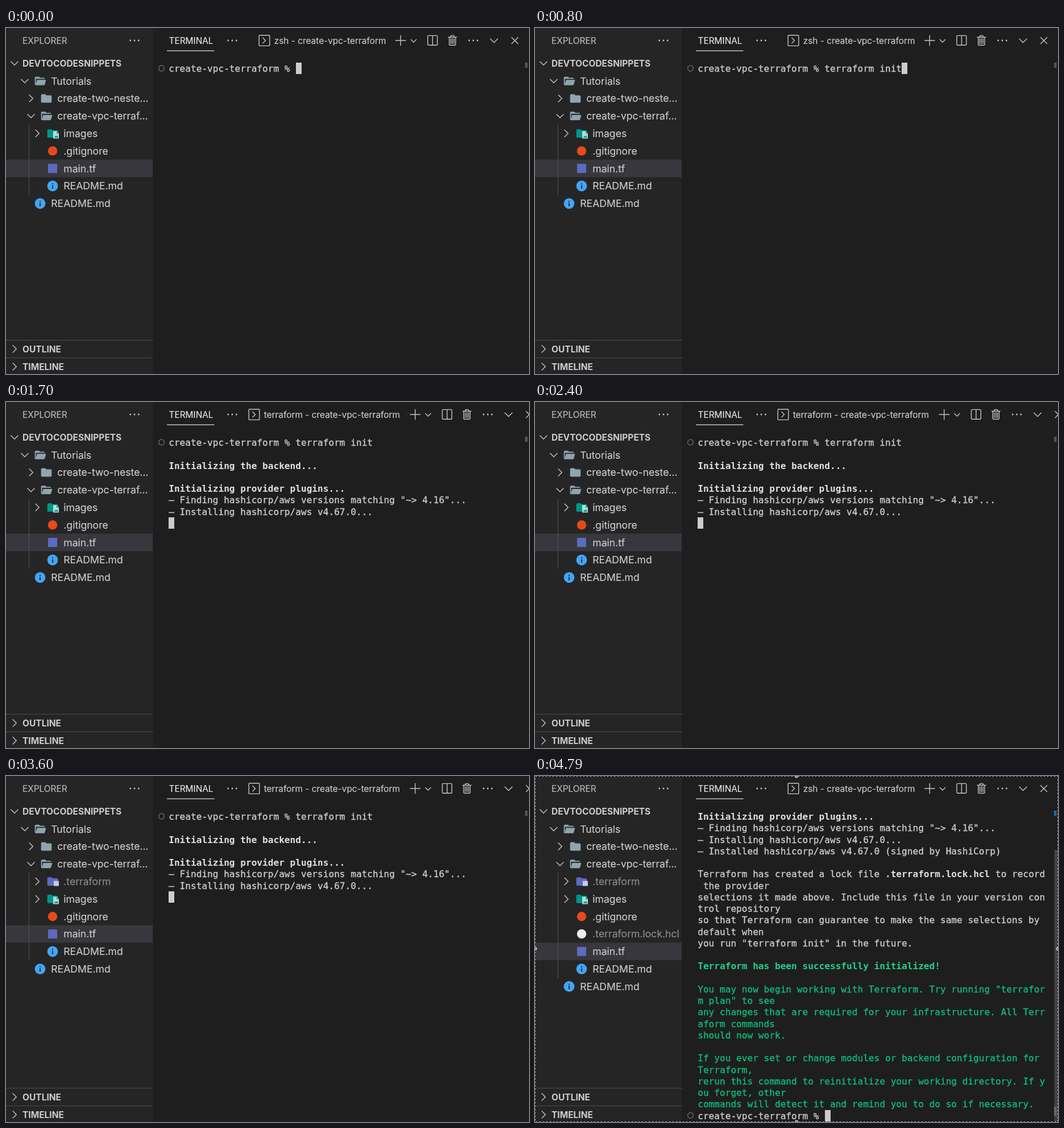
Write an HTML page that moves like this. It is 920 px wide and 609 px high and loops after 4970 ms.

```html
<!DOCTYPE html>
<html lang="en">
<head>
<meta charset="utf-8">
<title>Terminal session</title>
<style>
  html, body { margin: 0; width: 100%; height: 100%; overflow: hidden; background: #1e1e1e; }
  svg { display: block; width: 920px; height: 609px; }
  text { white-space: pre; font-family: Inter, "Open Sans", sans-serif; color: #ccc; }
  text, tspan { fill: currentColor; stroke: currentColor; stroke-width: .15px; }
  .tree { font-size: 17.6px; }
  .head { font-size: 15.4px; }
  .bold { font-size: 15.5px; font-weight: 700; stroke-width: 0; }
  .dim { color: #8c8c8c; }
  .soft { color: #bbb; }
  .lit { color: #e7e7e7; }
  .term { font: 16.13px "DejaVu Sans Mono", "Liberation Mono", monospace; font-variant-ligatures: none; stroke-width: .35px; }
  .strong { font-weight: 700; color: #e0e0e0; stroke-width: 0; }
  .green { color: #0dbc79; }
  .green .strong { color: #23d18b; }
  .line { fill: none; stroke: #c5c5c5; stroke-width: 1.4; }
</style>
</head>
<body>
<svg viewBox="0 0 920 609">
  <defs><clipPath id="side"><rect width="258" height="609"/></clipPath></defs>
  <rect width="920" height="609" fill="#1e1e1e"/>
  <rect width="258.5" height="609" fill="#252526"/>
  <g id="tree" clip-path="url(#side)"></g>
  <g id="frame"></g>
  <g id="bar"></g>
  <g id="term"></g>
  <g id="marquee"></g>
</svg>
<script>
const LOOP = 4970;
const ROW = 30.8, LINE = 20.25, CELL = 9.71, LEFT = 286.2, TOP = 61.4;
const el = id => document.getElementById(id);

const text = (x, y, s, cls) => `<text x="${x}" y="${y}" class="${cls}">${s}</text>`;
const path = d => `<path class="line" d="${d}"/>`;
const rect = (x, y, w, h, fill) => `<rect x="${x}" y="${y}" width="${w}" height="${h}" fill="${fill}"/>`;
const disc = (x, y, r, fill) => `<circle cx="${x}" cy="${y}" r="${r}" fill="${fill}"/>`;
const glyph = (x, y, scale, d, fill) =>
  `<path transform="translate(${x} ${y}) scale(${scale})" d="${d}" fill="${fill}" fill-rule="evenodd"/>`;
const down = (x, y, w = 6.5) => path(`M${x - w} ${y - w / 2}l${w} ${w}l${w} ${-w}`);
const right = (x, y, w = 6.5) => path(`M${x - w / 2} ${y - w}l${w} ${w}l${-w} ${w}`);
const dots = (x, y) => [-7.3, 0, 7.3].map(d => disc(x + d, y, 1.4, '#c5c5c5')).join('');

const SHUT = 'M10 4H4c-1.11 0-2 .89-2 2v12a2 2 0 0 0 2 2h16a2 2 0 0 0 2-2V8a2 2 0 0 0-2-2h-8l-2-2z';
const OPEN = 'M19 20H4c-1.11 0-2-.9-2-2V6c0-1.11.89-2 2-2h6l2 2h7a2 2 0 0 1 2 2H4v10l2.14-8h17.07l-2.28 8.5c-.23.87-1.01 1.5-1.93 1.5z';
const SPLIT = 'M14 1H3L2 2v11l1 1h11l1-1V2l-1-1zM8 13H3V2h5v11zm6 0H9V2h5v11z';
const TRASH = 'M10 3h3v1h-1v9l-1 1H4l-1-1V4H2V3h3V2a1 1 0 0 1 1-1h3a1 1 0 0 1 1 1v1zM9 2H6v1h3V2zM4 13h7V4H4v9zm2-8H5v7h1V5zm1 0h1v7H7V5zm2 0h1v7H9V5z';
const folder = (x, y, d, fill) => glyph(x - 11.2, y - 11.2, .933, d, fill);

const icons = {
  open: (x, y) => folder(x, y, OPEN, '#90a4ae'),
  shut: (x, y) => folder(x, y, SHUT, '#90a4ae'),
  images: (x, y) => folder(x, y, SHUT, '#009688') +
    `<path d="M${x + 1} ${y - 4}h6l4 4v9h-10z" fill="#b2dfdb"/>` +
    `<path d="M${x + 7} ${y - 3}v3.5h3.5zM${x + 2.5} ${y + 7.5}l2.5-3.5 1.5 1.5 1.5-2.5 2 4.5z" fill="#009688"/>`,
  badge: (x, y) => folder(x, y, SHUT, '#5c6bc0') + rect(x + 2, y - 1, 9, 9, '#c5cae9'),
  git: (x, y) => disc(x, y, 8.2, '#e64a19'),
  tf: (x, y) => rect(x - 8, y - 8, 16, 16, '#5c6bc0'),
  lock: (x, y) => disc(x, y, 8.2, '#eceff1'),
  info: (x, y) => disc(x, y, 9.4, '#42a5f5') +
    rect(x - 1, y - 4.7, 2, 2, '#252526') + rect(x - 1, y - 1, 2, 5.8, '#252526')
};

const entry = (depth, icon, label, chevron, dim) => ({ depth, icon, label, chevron, dim });

function drawTree(hasDir, hasLock) {
  const list = [
    entry(0, 'open', 'Tutorials', down),
    entry(1, 'shut', 'create-two-neste...', right),
    entry(1, 'open', 'create-vpc-terraf...', down),
    hasDir && entry(2, 'badge', '.terraform', right, true),
    entry(2, 'images', 'images', right),
    entry(2, 'git', '.gitignore'),
    hasLock && entry(2, 'lock', '.terraform.lock.hcl', null, true),
    entry(2, 'tf', 'main.tf'),
    entry(2, 'info', 'README.md'),
    entry(0, 'info', 'README.md')
  ].filter(Boolean);
  let out = '', guideEnd = 0;
  list.forEach((e, i) => {
    const y = 93.2 + i * ROW, x = 60 + e.depth * 11;
    if (e.label === 'main.tf') out += rect(0, y - ROW / 2, 258.5, ROW, '#37373d');
    if (e.depth === 2) guideEnd = y + ROW / 2;
    if (e.chevron) out += e.chevron(x - 27, y);
    out += icons[e.icon](x, y) + text(x + 19.3, y + 6.3, e.label, e.dim ? 'tree dim' : 'tree');
  });
  return out + rect(39.8, 170.2, 1, guideEnd - 170.2, '#585858');
}

function drawFrame() {
  return text(29, 27.6, 'EXPLORER', 'head soft') + dots(226, 22) +
    down(15, 62) + text(29, 68, 'DEVTOCODESNIPPETS', 'bold') +
    rect(0, 549, 258.5, 1, '#4b4b4c') + right(15, 565) + text(29, 570.8, 'OUTLINE', 'bold') +
    rect(0, 580, 258.5, 1, '#4b4b4c') + right(15, 596) + text(29, 601.6, 'TIMELINE', 'bold') +
    text(286.5, 27.6, 'TERMINAL', 'head lit') + rect(283, 39.5, 83.5, 1.2, '#e7e7e7') + dots(398, 22);
}

function drawBar(shell) {
  const wide = shell !== 'zsh', x = wide ? 436.5 : 454.5;
  const tools =
    path('M685 22h18.5M694.2 12.8v18.5') + down(717, 22.5, 5) +
    glyph(738.5, 11.3, 1.4, SPLIT, '#c5c5c5') + glyph(774.8, 11.3, 1.4, TRASH, '#c5c5c5') +
    dots(822, 22) + down(858.5, 22.2, 6.8) + path('M889.2 16.2l11.8 11.8M901 16.2l-11.8 11.8');
  return `<rect class="line" x="${x - 9.3}" y="12.8" width="18.6" height="18.6" rx="1"/>` +
    path(`M${x - 3} 17l5 5l-5 5`) +
    text(x + 17.2, 27.6, `${shell} - create-vpc-terraform`, 'head') +
    `<g transform="translate(${wide ? 25.5 : 0} 0)">${tools}</g>`;
}

const PROMPT = 'create-vpc-terraform % ';
const COMMAND = 'terraform init';

// Asterisks switch bold on and off
const BACKEND = ['', '*Initializing the backend...*', ''];
const PLUGINS = ['*Initializing provider plugins...*', '– Finding hashicorp/aws versions matching "~> 4.16"...'];
const INSTALL = '– Installing hashicorp/aws v4.67.0...';
const RESULT = [
  ...PLUGINS, INSTALL,
  '– Installed hashicorp/aws v4.67.0 (signed by HashiCorp)', '',
  'Terraform has created a lock file *.terraform.lock.hcl* to record',
  ' the provider',
  'selections it made above. Include this file in your version con',
  'trol repository',
  'so that Terraform can guarantee to make the same selections by ',
  'default when',
  'you run "terraform init" in the future.', '',
  '*Terraform has been successfully initialized!*', '',
  'You may now begin working with Terraform. Try running "terrafor',
  'm plan" to see',
  'any changes that are required for your infrastructure. All Terr',
  'aform commands',
  'should now work.', '',
  'If you ever set or change modules or backend configuration for ',
  'Terraform,',
  'rerun this command to reinitialize your working directory. If y',
  'ou forget, other',
  'commands will detect it and remind you to do so if necessary.',
  PROMPT
];

function drawTerm(lines, done) {
  const bold = s => s.split('*').map((p, i) => i % 2 ? `<tspan class="strong">${p}</tspan>` : p).join('');
  const last = lines.length - 1;
  const greenFrom = lines.findIndex(s => s.includes('successfully'));
  let out = lines.map((s, i) => {
    const green = done && i >= greenFrom && i < last;
    return text(LEFT, TOP + 15.8 + i * LINE, bold(s), green ? 'term green' : 'term');
  }).join('');
  const cursorX = Math.round(LEFT + lines[last].length * CELL);
  out += rect(cursorX, Math.round(TOP + last * LINE), 10, 20, '#ccc');
  const ringY = 71 + (done ? last * LINE : 0);
  out += `<circle cx="273.5" cy="${ringY}" r="4.9" fill="none" stroke="#666" stroke-width="1.5"/>`;
  out += rect(913, 61, 4.5, 9, done ? '#0e70b0' : '#555');
  if (done) out += rect(913.5, 130, 6.5, 479, '#434343') + rect(913, 582, 4.5, 16, '#666');
  return out;
}

function drawMarquee() {
  const ends = [[460, .5], [.5, 304], [919.5, 304], [460, 608.5]];
  return '<rect x=".5" y=".5" width="919" height="608" fill="none" stroke="#111"/>' +
    '<rect x=".5" y=".5" width="919" height="608" fill="none" stroke="#aaa" stroke-dasharray="3 3"/>' +
    ends.map(([x, y]) => `<circle cx="${x}" cy="${y}" r="2.5" fill="#888" stroke="#eee"/>`).join('');
}

const drawn = {};
function put(id, key, draw) {
  if (drawn[id] === key) return;
  drawn[id] = key;
  el(id).innerHTML = draw();
}

function render(t) {
  const hasDir = t >= 3400, done = t >= 3700, framed = t >= 4600;
  const shell = t >= 900 && !done ? 'terraform' : 'zsh';
  const typed = Math.min(COMMAND.length, 2 * Math.floor(t / 100));
  let lines = [PROMPT + COMMAND.slice(0, typed)];
  if (t >= 900) lines.push(...BACKEND, ...PLUGINS);
  if (t >= 1000) lines.push(INSTALL);
  if (t >= 900) lines.push('');
  if (done) lines = RESULT;

  put('frame', 'fixed', drawFrame);
  put('tree', `${hasDir}${done}`, () => drawTree(hasDir, done));
  put('bar', shell, () => drawBar(shell));
  put('term', lines.join('|'), () => drawTerm(lines, done));
  put('marquee', framed, () => framed ? drawMarquee() : '');
}

const start = performance.now();
function tick() {
  render((performance.now() - start) % LOOP);
  requestAnimationFrame(tick);
}
tick();
</script>
</body>
</html>
```
